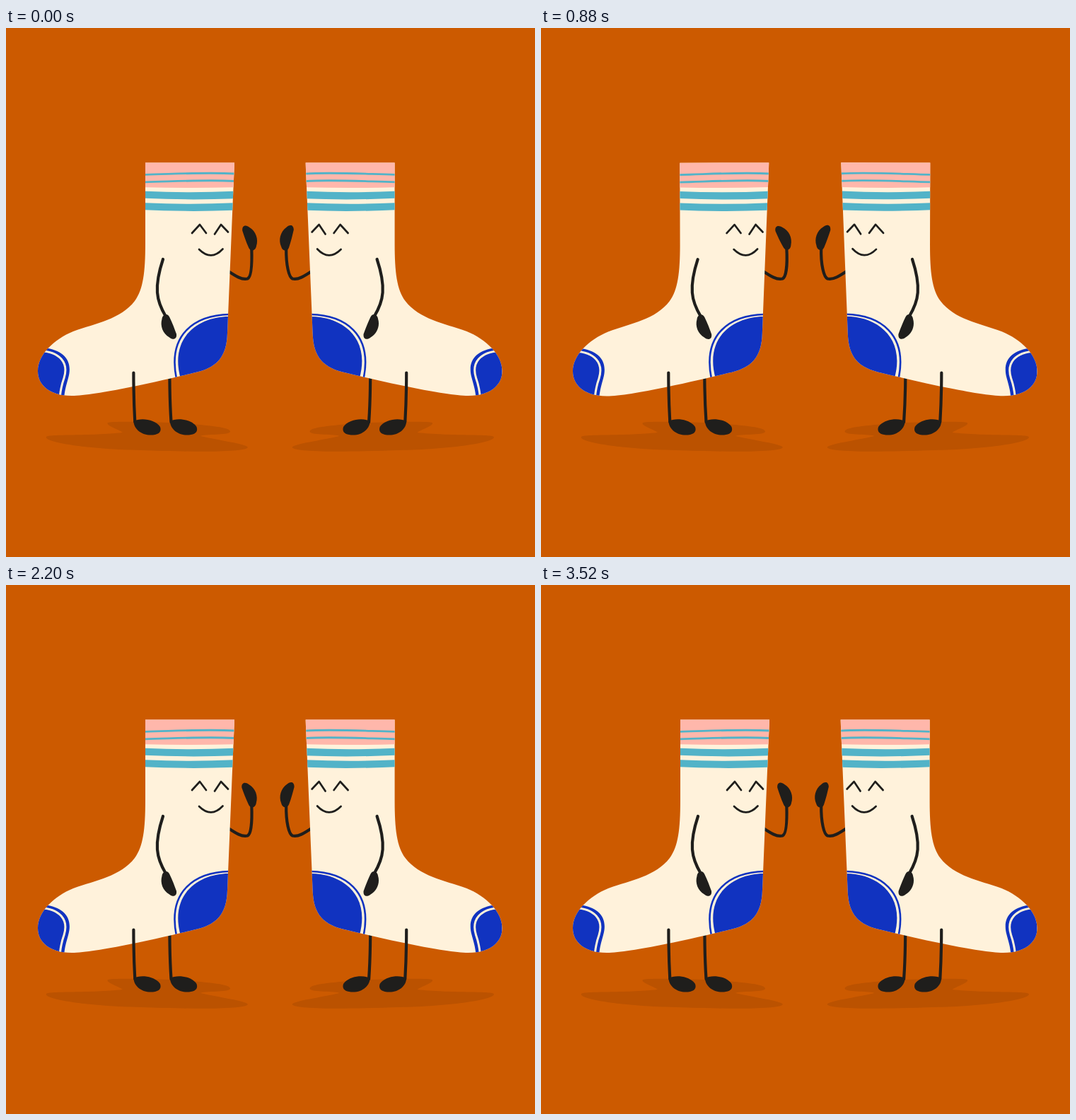
Recreate the animation shown at these times as an HTML page. Size 748 by 748 pixels, loop 3560 ms.

```html
<!DOCTYPE html>
<html lang="en">
<head>
<meta charset="utf-8">
<title>Sock high five</title>
<style>
  html, body { margin: 0; width: 100%; height: 100%; overflow: hidden; background: #cc5a00; }
  svg { display: block; width: 100vw; height: 100vh; }
  .ink { fill: none; stroke: #1f1e1c; stroke-width: 4.2; stroke-linecap: round; stroke-linejoin: round; }
  .face { stroke-width: 2.7; }
  .solid { fill: #1f1e1c; }
  .teal { fill: #52b3c8; }
  .thin { fill: none; stroke: #52b3c8; stroke-width: 2.8; }
  .blue { fill: #1133c0; }
  .spark { stroke: #ffb798; stroke-linecap: round; }
</style>
</head>
<body>
<svg id="stage" viewBox="0 0 748 748">
  <defs>
    <path id="sock" d="M197 190.500H323L313 431C312 466 298 481 264 488C205 502 125 520 93 520C62 520 45 505 45 485C45 462 68 440 95 429C128 417 162 412 182 386C194 370 197 345 197 305Z"/>
    <clipPath id="cut"><use href="#sock"/></clipPath>
    <path id="shadow" fill="#bb5200" d="M57 578C60 574 120 577 165 572C160 568 140 562 144 558C150 555 250 558 262 560C300 563 318 566 317 571C315 576 280 574 275 577C300 583 340 588 342 593C338 601 250 599 190 597C120 596 52 586 57 578Z"/>
    <path id="foot" class="solid" d="M180.500 556C190 550.500 211 553 218 564C221 573 213 576 202 575.500C190 574.500 180.500 566 180.500 556Z"/>
    <path id="palm" class="solid" d="M-3 -4C-4 -14 -4 -22 -4 -30C-2 -38 4 -36 7 -31C14 -23 14 -11 8 -3C5 3 -2 3 -3 -4Z"/>
    <g id="knit">
      <use href="#sock" fill="#fff2db"/>
      <g clip-path="url(#cut)">
        <path fill="#ffb7ab" d="M190 185H330V225Q260 227 190 225Z"/>
        <path class="thin" id="stripe" d="M190 207.500C230 207 290 203 330 206.500"/>
        <use href="#stripe" y="10.500"/>
        <path class="teal" id="band" d="M190 230.500Q260 234 330 230.500V241Q260 244 190 240.500Z"/>
        <use href="#band" y="16.500"/>
        <path class="blue" d="M315 408C274 408 230 436 247 496H330V408Z"/>
        <path d="M316 405C268 406 228 432 241 496" fill="none" stroke="#1133c0" stroke-width="2.6"/>
        <path class="blue" d="M54 452C82 456 95 470 88 495C85 506 83 512 82 524H30V450Z"/>
        <path d="M48 456.500C76 458 89 473 82 495C78 506 77 512 76 524" fill="none" stroke="#fff2db" stroke-width="3"/>
      </g>
      <path class="ink face" d="M263 290L274 278L283 290M295 291.500L304 278L314 288.500M273 313Q290 330 306.500 312.500"/>
    </g>
    <g id="hanging">
      <path class="ink" d="M222 327C216 345 213 360 214 374C215 388 220 398 226 408"/>
      <use href="#palm" transform="translate(227 406) rotate(160)"/>
    </g>
  </defs>
</svg>
<script>
const stage = document.getElementById('stage');
const LOOP = 3560, BEAT = 1200;

const add = (tag, attrs, parent) => {
  const el = document.createElementNS('http://www.w3.org/2000/svg', tag);
  for (const k in attrs) el.setAttribute(k, attrs[k]);
  return parent.appendChild(el);
};
const clamp = p => Math.min(1, Math.max(0, p));
const mix = (a, b, p) => a + (b - a) * p;
const span = (t, a, b) => clamp((t - a) / (b - a));
const sine = p => .5 - .5 * Math.cos(Math.PI * p);

// tilt of the body in degrees: forward, back, upright
const lean = t =>
  t < 440 ? mix(0, 1.85, sine(t / 440)) :
  t < 640 ? mix(1.85, -.9, sine(span(t, 440, 640))) :
  mix(-.9, 0, sine(span(t, 640, 960)));

// raised hand: 0 at rest, 1 touching, negative pulled back
const reach = t =>
  t < 470 ? span(t, 0, 400) ** 2.3 :
  t < 700 ? mix(1, -.3, sine(span(t, 470, 640))) :
  mix(-.3, 0, sine(span(t, 700, 1120)));

function makeSock({ pivot: [px, py], wrist, tilt, mirrored }) {
  const g = add('g', mirrored ? { transform: 'matrix(-1 0 0 1 746.6 0)' } : {}, stage);
  const use = (id, parent = g, attrs = {}) => add('use', { href: '#' + id, ...attrs }, parent);
  const line = () => add('path', { class: 'ink' }, g);

  use('shadow');
  const backLeg = line();
  use('foot', g, { x: 51.5 });
  const arm = line(), palm = use('palm');
  const body = add('g', {}, g);
  use('knit', body);
  const hanging = use('hanging', body);
  const frontLeg = line();
  use('foot');

  return t => {
    const a = lean(t), r = a * Math.PI / 180;
    body.setAttribute('transform', `rotate(${a} ${px} ${py})`);
    hanging.setAttribute('transform', `rotate(${a * 1.1} 222 327)`);

    const hip = 180.4 + a * .95;
    frontLeg.setAttribute('d', `M${hip} 487.5C${hip} 515 181 535 182.3 557`);
    backLeg.setAttribute('d', `M${hip + 51} 487C${hip + 51} 515 232 535 233.5 557`);

    const q = reach(t), out = Math.max(q, 0);
    const sx = 313 - r * (343 - py), sy = 343 + r * (313 - px);
    const ex = mix(341.5, 346, out), ey = mix(354.5, 361, out);
    const wx = mix(wrist, 361.8, out), wy = mix(313.7, 317.5, q);
    const turn = mix(tilt, 14.5, q);
    arm.setAttribute('d', `M${sx} ${sy}C${sx + 12} ${sy + 8} ${ex - 8} ${ey + 2} ${ex} ${ey}` +
      `C${ex + 5} ${ey - 2} ${wx - 1 - turn * .1} ${wy + 22} ${wx} ${wy - 2}`);
    palm.setAttribute('transform', `translate(${wx} ${wy}) rotate(${turn})`);
  };
}

// alternating streaks and dots, spread evenly between two angles
function makeFan(count, from, to) {
  return Array.from({ length: count }, (_, i) => {
    const angle = mix(from, to, i / (count - 1)), streak = i % 2 === 0;
    const el = add('line', { class: 'spark', transform: `translate(375 297) rotate(${angle})` }, stage);
    return t => {
      const fly = (t - 440) / 200;
      const head = streak ? 31 + 13.5 * span(t, 440, 600) : 26 + 10 * fly;
      const tail = streak ? 31 + 13.5 * span(t, 650, 800) : head;
      el.setAttribute('x1', tail);
      el.setAttribute('x2', head + .01);
      el.setAttribute('stroke-width', (streak ? 1.3 : 2.6) * span(t, 800, 720));
      el.setAttribute('visibility', t >= 400 && t < 800 ? 'visible' : 'hidden');
    };
  });
}

const parts = [
  makeSock({ pivot: [300, 490], wrist: 347.3, tilt: -18 }),
  makeSock({ pivot: [216.6, 495], wrist: 350.4, tilt: -13, mirrored: true }),
  ...makeFan(7, 209, 373),
  ...makeFan(3, 75, 108)
];

function frame() {
  const t = performance.now() % LOOP % BEAT;
  for (const draw of parts) draw(t);
  requestAnimationFrame(frame);
}
frame();
</script>
</body>
</html>
```
